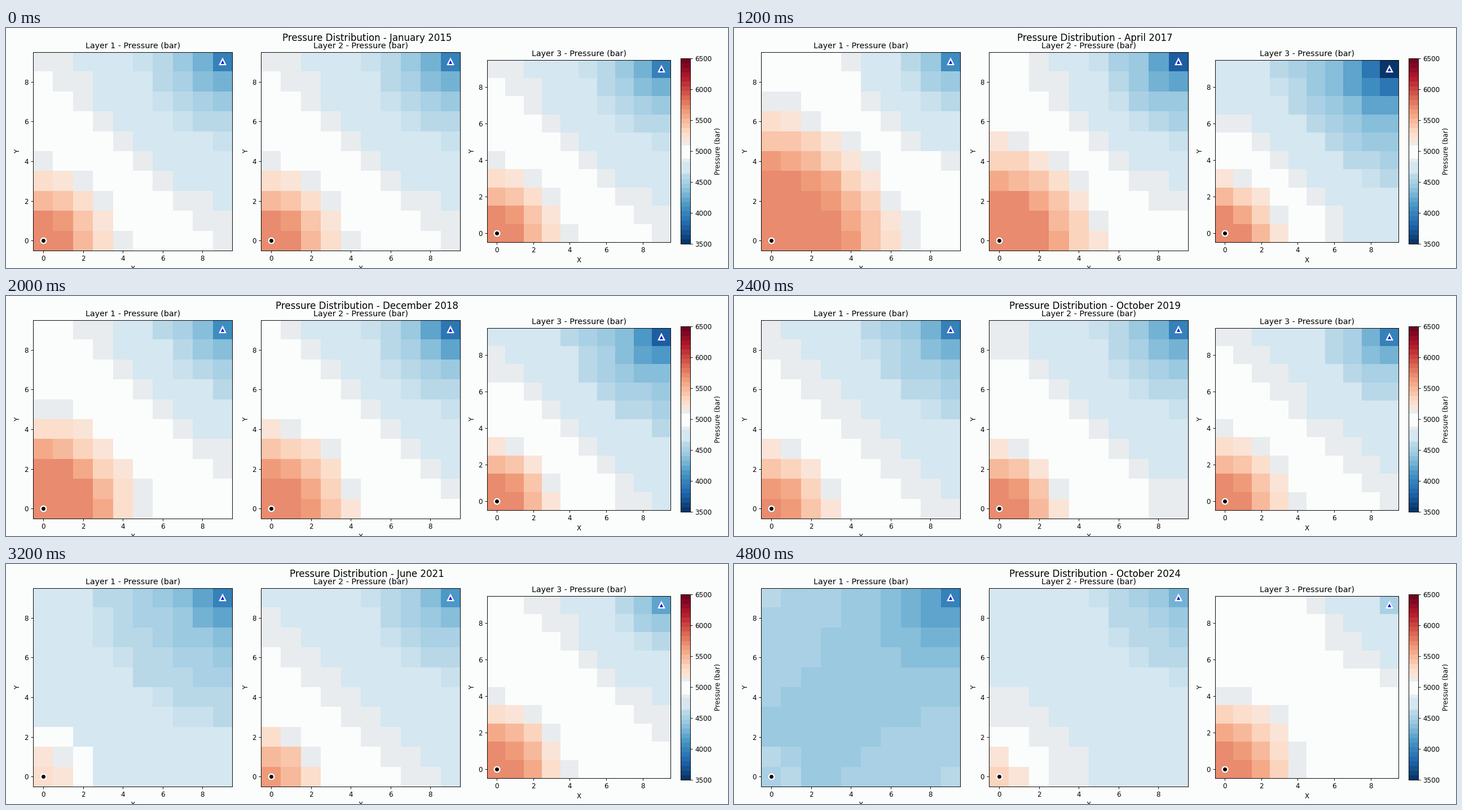
A matplotlib script that plays this animation: 1280 px wide and 427 px high, repeating every 5000 ms.

```python
import numpy as np
import matplotlib.pyplot as plt
from matplotlib.animation import FuncAnimation
from matplotlib.colors import ListedColormap, to_rgb

W, H, DPI = 1280, 427, 1280 / 15
FRAMES = 25
P_MIN, P_MAX, P_TOP, BAND = 3500, 6500, 5735, 75
PAPER, HAZE = "#fbfdfc", "#e8ecee"
MONTHS = ("January February March April May June July August "
          "September October November December").split()

# Reservoir state: corner pressure, injector and producer strength,
# height and radius of the gas bank around the injector
START = np.array([4865, 240, 240, 340, 2.6])
# Change of that state per layer at full surge and at full depletion
SURGE = np.array([(185, 60, 10, 140, 3.0),
                  (85, 10, 90, 40, 2.0),
                  (-140, 40, 105, -40, 0.2)])
DEPLETION = np.array([(-305, -370, -45, -80, -1.1),
                      (-105, -150, -110, -90, -1.0),
                      (135, -115, -100, 100, 0.45)])

Y, X = np.mgrid[0:10, 0:10]
INJ_SQ = X ** 2 + Y ** 2
PROD_SQ = (9 - X) ** 2 + (9 - Y) ** 2


def banded_cmap():
    """RdBu_r in flat steps, with a broad white centre and pale rims."""
    p = np.arange(P_MIN, P_MAX, 5) + 2.5
    mids = P_MIN + BAND * ((p - P_MIN) // BAND + 0.5)
    mids[(p > 4650) & (p < 4830)] = 4740
    colors = plt.get_cmap("RdBu_r")((mids - P_MIN) / (P_MAX - P_MIN))
    off_centre = abs(p - 4988)
    colors[off_centre < 162, :3] = to_rgb(HAZE)
    colors[off_centre < 102, :3] = to_rgb(PAPER)
    return ListedColormap(colors)


def log_well(dist_sq, core):
    return np.log((dist_sq + core) / 81) / 2


def pressure(layer, i):
    surge = np.interp(i, [0, 3, 8, 12], [0, 1, 0.8, 0])
    t = np.clip((i - 11.3) / 12.7, 0, 1)
    depletion = 1 - (1 - t) ** 1.5
    corner, inj, prod, bank, radius = (
        START + surge * SURGE[layer] + depletion * DEPLETION[layer])
    p = (corner - inj * log_well(INJ_SQ, 0.3) + prod * log_well(PROD_SQ, 0.1)
         + bank * np.exp(-(INJ_SQ / radius ** 2) ** 2))
    return np.minimum(p, P_TOP)


def date_label(i):
    # Steps use 365-day years, so dates slip back after the 2016 leap day
    month = 5 * i - 2 - (i > 3) if i else 0
    return f"{MONTHS[month % 12]} {2015 + month // 12}"


def px_axes(left, top, right, bottom):
    return fig.add_axes([left / W, 1 - bottom / H,
                         (right - left) / W, (bottom - top) / H])


def draw_layer(k, box):
    ax = px_axes(*box)
    im = ax.imshow(pressure(k, 0), cmap=cmap, vmin=P_MIN, vmax=P_MAX,
                   origin="lower", aspect="auto", interpolation="nearest")
    for spot, marker, color in [(0, "o", "black"), (9, "^", "blue")]:
        ax.plot(spot, spot, marker, color=color, ms=8, mec="white", mew=2)
    ax.set(xlim=(-0.5, 9.5), ylim=(-0.5, 9.5), xlabel="X", ylabel="Y",
           xticks=range(0, 10, 2), yticks=range(0, 10, 2),
           title=f"Layer {k + 1} - Pressure (bar)")
    return im


plt.rcParams["font.family"] = "DejaVu Sans"
fig = plt.figure(figsize=(W / DPI, (H + 1e-6) / DPI), dpi=DPI, facecolor=PAPER)
cmap = banded_cmap()
boxes = [(48.2, 42.7, 401.4, 395.8),
         (452.3, 42.7, 805.4, 395.8),
         (853.4, 56.8, 1177.8, 381.1)]
images = [draw_layer(k, box) for k, box in enumerate(boxes)]
fig.colorbar(images[-1], cax=px_axes(1196.4, 54.2, 1213, 384.2),
             label="Pressure (bar)", ticks=range(P_MIN, P_MAX + 1, 500))
heading = fig.suptitle("", fontsize=14)


def update(i):
    for k, im in enumerate(images):
        im.set_data(pressure(k, i))
    heading.set_text(f"Pressure Distribution - {date_label(i)}")
    return [*images, heading]


anim = FuncAnimation(fig, update, frames=FRAMES, interval=200,
                     repeat=True, repeat_delay=0, blit=False)
plt.show()
```
